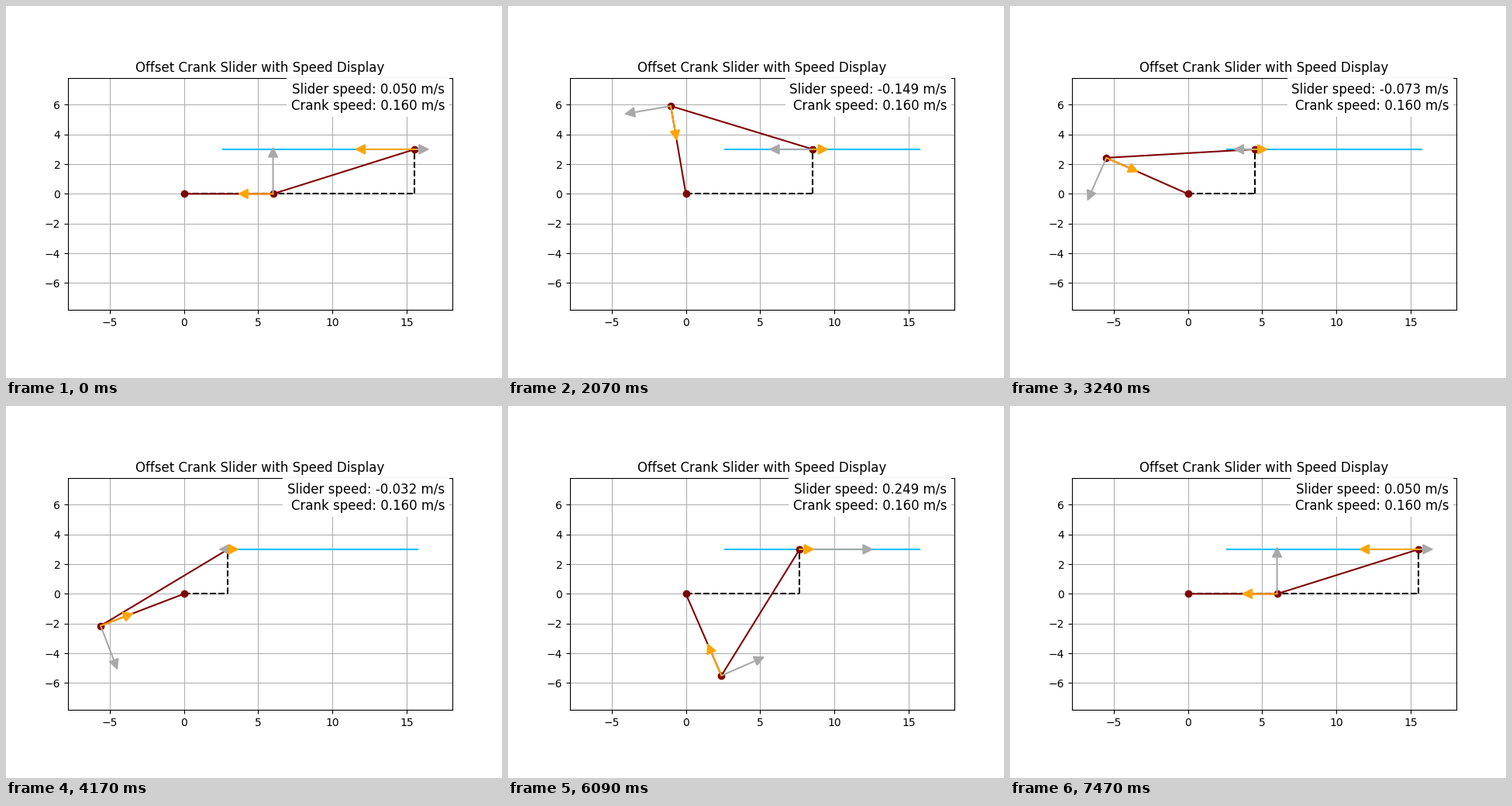
Animation, 640 px wide and 480 px high, one loop 7500 ms. Source, as a matplotlib script:

```python
import numpy as np
import matplotlib.pyplot as plt
from matplotlib.animation import FuncAnimation
from matplotlib.patches import FancyArrowPatch

CRANK, ROD, OFFSET = 6.0, 10.0, 3.0   # cm
OMEGA = 2.66                          # rad/s
FRAMES, INTERVAL = 250, 30
VEL_SCALE = 0.2 * OMEGA               # arrow length per unit of d/dtheta
ACC_SCALE = 0.4

theta = np.linspace(0, 2 * np.pi, FRAMES)
cx, cy = CRANK * np.cos(theta), CRANK * np.sin(theta)

# Slider position and its first two derivatives with respect to theta
u = OFFSET - cy
reach = np.sqrt(ROD**2 - u**2)
sx = cx + reach
sv = -cy + u * cx / reach
sa = -cx - (cx**2 + u * cy) / reach - (u * cx)**2 / reach**3

x_min = np.sqrt((ROD - CRANK)**2 - OFFSET**2)
x_max = np.sqrt((ROD + CRANK)**2 - OFFSET**2)

fig, ax = plt.subplots(figsize=(6.4, 4.8), dpi=100)
ax.set_aspect("equal")
ax.set_xlim(-1.3 * CRANK, 1.15 * x_max)
ax.set_ylim(-1.3 * CRANK, 1.3 * CRANK)
ax.grid(True)
ax.set_title("Offset Crank Slider with Speed Display")

ax.plot([x_min, x_max], [OFFSET, OFFSET], color="deepskyblue")
base, = ax.plot([], [], "k--")
drop, = ax.plot([], [], "k--")
links, = ax.plot([], [], "o-", color="maroon")
label = ax.text(0.98, 0.98, "", transform=ax.transAxes, fontsize=12,
                ha="right", va="top",
                bbox=dict(facecolor="white", edgecolor="none"))


def make_arrow(color):
    arrow = FancyArrowPatch((0, 0), (1, 0), arrowstyle="-|>", color=color,
                            lw=1.5, mutation_scale=20, shrinkA=0, shrinkB=0,
                            zorder=3)
    return ax.add_patch(arrow)


crank_vel, slider_vel = make_arrow("darkgray"), make_arrow("darkgray")
crank_acc, slider_acc = make_arrow("orange"), make_arrow("orange")


def point(arrow, x, y, dx, dy, scale):
    arrow.set_positions((x, y), (x + scale * dx, y + scale * dy))


def update(i):
    x, y, s = cx[i], cy[i], sx[i]
    links.set_data([0, x, s], [0, y, OFFSET])
    base.set_data([0, s], [0, 0])
    drop.set_data([s, s], [0, OFFSET])
    point(crank_vel, x, y, -y, x, VEL_SCALE)
    point(crank_acc, x, y, -x, -y, ACC_SCALE)
    point(slider_vel, s, OFFSET, sv[i], 0, VEL_SCALE)
    point(slider_acc, s, OFFSET, sa[i], 0, ACC_SCALE)
    label.set_text(f"Slider speed: {sv[i] * OMEGA / 100:.3f} m/s\n"
                   f"Crank speed: {CRANK * OMEGA / 100:.3f} m/s")
    return (links, base, drop, crank_vel, slider_vel,
            crank_acc, slider_acc, label)


anim = FuncAnimation(fig, update, frames=FRAMES, interval=INTERVAL,
                     repeat=True, repeat_delay=0)
plt.show()
```
